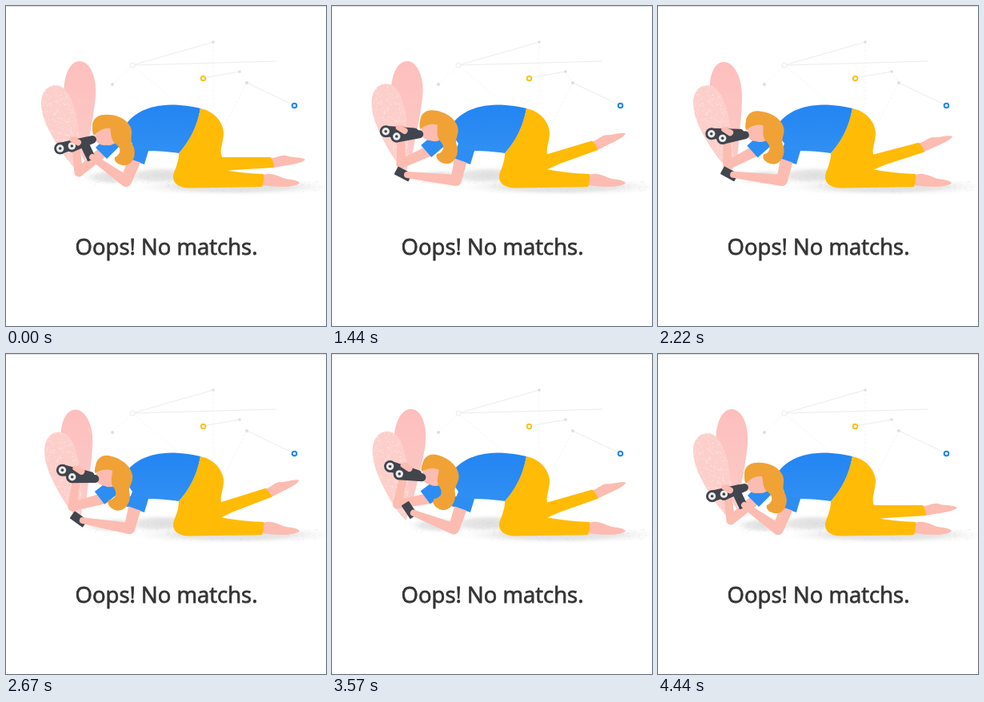
Write an HTML page that moves like this. It is 400 by 400 pixels and loops after 4.47 s.

```html
<!DOCTYPE html>
<html lang="en">
<head>
<meta charset="utf-8">
<title>No matches</title>
<style>
  html, body { margin: 0; width: 100%; height: 100%; overflow: hidden; background: #fff; }
  svg { display: block; width: 100vw; height: 100vh; }
  text { font: 27.5px "Open Sans", "Noto Sans", sans-serif; fill: #353535; stroke: #353535; stroke-width: .8; }
  .skin { fill: #fcbcb1; }
  .shirt { fill: #2d8df3; }
  .pants { fill: #ffbb06; }
  .hair { fill: #f0a236; }
  .dark { fill: #41454e; }
  .net { fill: none; stroke: #e6e6e6; stroke-width: .8; }
  .faint { stroke: #f3f3f3; stroke-dasharray: 3 2; }
  .grain { stroke-linecap: round; stroke-width: 1.1; fill: none; }
</style>
</head>
<body>
<svg viewBox="0 0 400 400">
  <defs>
    <radialGradient id="shade">
      <stop offset="0" stop-color="#dedede"/>
      <stop offset=".5" stop-color="#e8e8e8"/>
      <stop offset="1" stop-color="#fff" stop-opacity="0"/>
    </radialGradient>
    <linearGradient id="backTone" x2="0" y2="1">
      <stop offset="0" stop-color="#fdbfbd"/>
      <stop offset="1" stop-color="#fccac6"/>
    </linearGradient>
    <linearGradient id="shirtTone" x2="0" y2="1">
      <stop offset="0" stop-color="#2385f2"/>
      <stop offset="1" stop-color="#3492f3"/>
    </linearGradient>
    <path id="leaf" d="M62 99C76 99 86 122 89 145C92 165 96 190 93 208C80 200 60 170 50 148C40 125 41 100 62 99Z"/>
    <clipPath id="leafClip"><use href="#leaf"/></clipPath>
    <g id="lens">
      <circle class="dark" r="7.500"/><circle r="4.700" fill="#eee"/><circle class="dark" r="1.800"/>
    </g>
  </defs>

  <path d="M0 .5H400" stroke="#dedede"/>

  <g class="net">
    <path d="M158 74L259 45M158 74L338 69M246 90L292 82M301 96L360 124"/>
    <path class="faint" d="M259 45V130M133 98L158 74L222 128M301 96L268 160M292 82L301 96"/>
    <circle cx="158" cy="74" r="3" fill="#fff"/>
  </g>
  <g fill="#dedede">
    <circle cx="259" cy="45" r="1.800"/><circle cx="133" cy="98" r="2"/>
    <circle cx="292" cy="82" r="1.800"/><circle cx="301" cy="96" r="2"/>
  </g>
  <g fill="#fff" stroke-width="2">
    <circle cx="246.500" cy="90.500" r="2.800" stroke="#f7c226"/>
    <circle cx="360.500" cy="124.500" r="2.800" stroke="#2287f3"/>
  </g>

  <g fill="url(#shade)">
    <ellipse cx="135" cy="214" rx="46" ry="11"/>
    <ellipse cx="196" cy="212" rx="60" ry="13"/>
    <ellipse cx="285" cy="226" rx="140" ry="12"/>
  </g>
  <path id="floorGrain" class="grain" stroke="#d4d4d4" opacity=".6"/>

  <path id="backLeaf" fill="url(#backTone)" d="M92 69C106 69 114 92 112 112C110 138 103 165 99 195C88 175 76 145 73 118C70 92 78 69 92 69Z"/>
  <g id="frontLeaf">
    <use href="#leaf" fill="#fccfcb"/>
    <path id="leafGrain" class="grain" stroke="#fff" opacity=".55" clip-path="url(#leafClip)"/>
  </g>

  <g id="farLeg">
    <path class="skin" d="M331 190C339 190 343 186 350 187C357 190 368 188 374 192C370 197 356 198 334 202Z"/>
    <path class="pants" d="M248 184L270 189H331Q335 195 335 202L284 205L256 209Z"/>
  </g>

  <path id="farArm" class="skin"/>
  <path id="farSleeve" stroke="#2d8df3" stroke-width="20"/>
  <rect id="phone" class="dark" x="-10" y="-5.500" width="20" height="11" rx="1"/>

  <path fill="url(#shirtTone)" d="M146 155C156 134 178 124 206 123.500C222 123.500 235 126 243 128C239 152 229 170 216 184C203 182 189 181 178 181L173 198L149 190C152 184 156 178 158 172Z"/>
  <path class="skin" d="M322 211C332 207 340 213 350 216C358 217 364 218 367 221C363 227 340 227 320 224Z"/>
  <path class="pants" d="M243 128C258 131 271 143 272 158C272 171 266 179 270 189L262 203Q292 209 322 210Q323 218 320 226L232 227.500C214 228 206 220 210 208C214 198 216 192 216 184C230 168 239 150 243 128Z"/>

  <path id="frontArm" class="skin"/>
  <path class="shirt" d="M153 178L178 180L172 197L149 189Z"/>

  <g id="head">
    <path class="skin" d="M110 156L130 148L140 168Q134 175 126 174Q116 175 113 169Z"/>
    <path class="hair" d="M108 152C107 143 113 136 123 136C133 135 149 139 155 150C160 159 154 166 158 173C164 183 160 197 150 199C142 200 134 195 136 189C143 186 145 179 138 173C130 168 132 159 130 153C123 152 115 156 110 162C108 159 108 156 108 152Z"/>
  </g>

  <path id="barrels" class="dark"/>
  <use id="lens1" href="#lens"/>
  <use id="lens2" href="#lens"/>
  <path id="farHand" class="skin"/>

  <text x="200.500" y="311" text-anchor="middle">Oops! No matchs.</text>
</svg>
<script>
const LOOP = 4470;
const BEATS = [0, 840, 1500, 2100, 3200];
const $ = id => document.getElementById(id);

// Periodic monotone cubic through one value per beat
function track(...values) {
  const n = BEATS.length;
  const at = i => BEATS[(i + n) % n] + LOOP * Math.floor(i / n);
  const val = i => values[(i + n) % n];
  const rise = i => (val(i + 1) - val(i)) / (at(i + 1) - at(i));
  const slope = i => {
    const a = rise(i - 1), b = rise(i);
    return a * b > 0 ? 2 * a * b / (a + b) : 0;
  };
  return t => {
    const i = BEATS.findLastIndex(b => b <= t);
    const h = at(i + 1) - at(i), u = (t - at(i)) / h, v = 1 - u;
    return v * v * (1 + 2 * u) * val(i) + u * u * (3 - 2 * u) * val(i + 1)
      + u * v * h * (v * slope(i) - u * slope(i + 1));
  };
}

const lookUp = track(0, 0, .43, .33, 1);
const kick = track(0, 0, 17, 14.5, 20);
const phoneUp = track(1, 0, 0, 0, .35);

const wave = (t, cycles) => Math.cos(2 * Math.PI * cycles * t / LOOP);
const mix = (a, b, k) => a.map((v, i) => v + (b[i] - v) * k);
const add = ([x, y], dx, dy) => [x + dx, y + dy];

// Tapered round-ended segment
function limb([ax, ay], ra, [bx, by], rb) {
  const d = Math.hypot(bx - ax, by - ay) || 1;
  const nx = (ay - by) / d, ny = (bx - ax) / d;
  return `M${ax + nx * ra} ${ay + ny * ra}A${ra} ${ra} 0 0 1 ${ax - nx * ra} ${ay - ny * ra}`
    + `L${bx - nx * rb} ${by - ny * rb}A${rb} ${rb} 0 0 1 ${bx + nx * rb} ${by + ny * rb}Z`;
}

function grain(seed, count, x, y, w, h) {
  const rnd = () => (seed = seed * 16807 % 2147483647) / 2147483647;
  let d = '';
  while (count--) d += `M${x + rnd() * w} ${y + rnd() * h}h0`;
  return d;
}

const set = (id, name, value) => $(id).setAttribute(name, value);
const place = (id, p, turn = 0) => set(id, 'transform', `translate(${p}) rotate(${turn})`);
const spin = (id, turn, x, y) => set(id, 'transform', `rotate(${turn} ${x} ${y})`);

function drawLeaves(t) {
  spin('backLeaf', 2.5 * (wave(t, 1) - 1) + 2.8 * (1 - wave(t, 2)), 98, 192);
  spin('frontLeaf', 2.9 * (1 - wave(t + 120, 2)), 93, 208);
}

function drawBinoculars(k) {
  const mid = [75 - 10 * k + 18 * k * k, 176.5 - 39.5 * k];
  const turn = (57 * Math.sqrt(k) - 12) * Math.PI / 180;
  const dx = 7.5 * Math.cos(turn), dy = 7.5 * Math.sin(turn);
  const l1 = add(mid, -dx, -dy), l2 = add(mid, dx, dy);
  const eye = [108 + 7 * k * k, 167 - 16 * k];
  set('barrels', 'd', limb(l1, 7, add(eye, -.9 * dx, -.9 * dy), 5) + limb(l2, 7.5, eye, 5));
  place('lens1', l1);
  place('lens2', l2);
  return mid;
}

function drawFarArm(k, grip) {
  const elbow = mix([91, 208], [79, 183], k);
  const hand = add(grip, 11 + 4 * k, -9 + 5 * k);
  set('farArm', 'd', limb([124, 180], 7, elbow, 5.5) + limb(elbow, 5.5, hand, 4.5));
  set('farHand', 'd', limb(add(hand, -4, -1), 3, add(hand, 4, 3), 4));
  set('farSleeve', 'd', `M145 158L${mix([119, 184], [116, 178], k)}`);
}

function drawFrontArm(k) {
  const phone = mix([89, 210], [103, 183], k);
  const elbow = [155 - 5 * k, 218 + k];
  const hand = add(phone, 5, 1 + 5 * k);
  set('frontArm', 'd', limb([161, 192], 8, elbow, 7) + limb(elbow, 7, hand, 4));
  place('phone', phone, 28 + 37 * Math.sin(k * Math.PI / 2));
}

function draw(t) {
  const k = Math.max(0, lookUp(t));
  drawLeaves(t);
  spin('farLeg', -kick(t), 258, 200);
  spin('head', 24 * k, 156, 160);
  drawFarArm(k, drawBinoculars(k));
  drawFrontArm(phoneUp(t));
}

set('leafGrain', 'd', grain(7, 420, 40, 98, 56, 110));
set('floorGrain', 'd', grain(31, 90, 105, 207, 110, 16) + grain(53, 130, 200, 218, 195, 15));

function tick() {
  draw(performance.now() % LOOP);
  requestAnimationFrame(tick);
}
tick();
</script>
</body>
</html>
```
